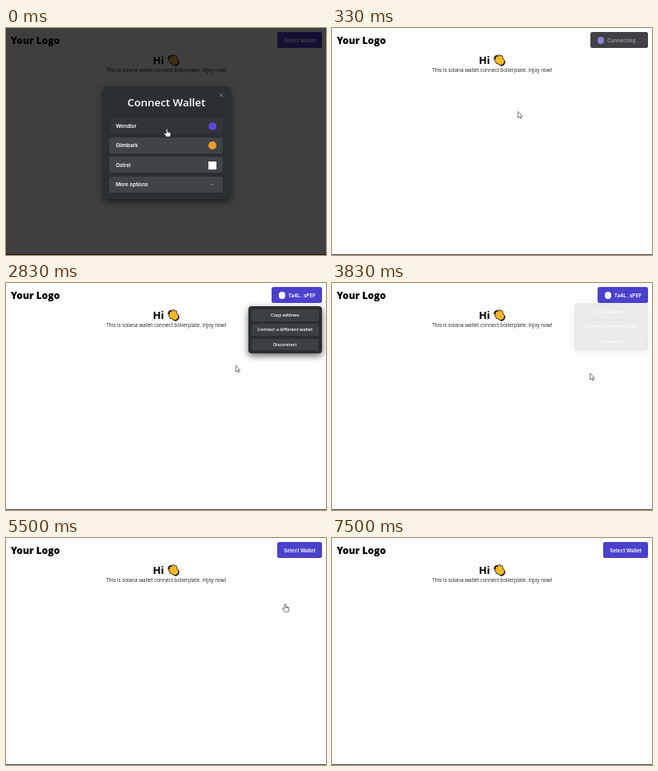
Animation, 400 px wide and 284 px high, one loop 8990 ms. Source, as an HTML page:

```html
<!DOCTYPE html>
<html lang="en">
<head>
<meta charset="utf-8">
<title>Wallet connect demo</title>
<style>
html, body { margin: 0; width: 100%; height: 100%; overflow: hidden; background: #fdfdfd; }
body { font-family: "Open Sans", "Noto Sans", sans-serif; color: #000; }
#stage { position: relative; width: 400px; height: 284px; overflow: hidden; }
#stage > *, .abs { position: absolute; white-space: nowrap; }
.logo { left: 6px; top: 6px; font-weight: 800; font-size: 12px; line-height: 20px; }
.hi { left: 183.5px; top: 29.5px; font-weight: 700; font-size: 13.2px; line-height: 20px; }
.wave { left: 201px; top: 32px; }
.sub { left: 0; width: 400.6px; top: 48px; text-align: center; font-size: 6.33px; line-height: 10px; color: #222; }
.floor { left: 0; top: 283px; width: 400px; height: 1px; background: #4a4a4c; }
#overlay { left: 0; top: 0; width: 400px; height: 284px; background: rgba(0,0,0,.75); }
.modal { left: 121.5px; top: 73px; width: 158.5px; height: 141px; border-radius: 4px;
  background: #2b2f31; box-shadow: 0 3px 8px rgba(0,0,0,.6); color: #fff; }
.title { left: 0; width: 158px; top: 10px; text-align: center; font-weight: 600; font-size: 13.4px; line-height: 20px; }
.wallet, #button { display: flex; align-items: center; box-sizing: border-box; padding: 1px 8px 0;
  height: 20px; border-radius: 2.5px; font: 600 6.33px/20px Inter, Roboto, sans-serif; }
.wallet { left: 7.7px; width: 142.3px; justify-content: space-between; background: #404447; }
.wallet.hover { background: #313537; }
.mark { width: 10px; height: 10px; }
.round { border-radius: 50%; }
#button { right: 5px; top: 5px; background: #4a41cc; color: #fff; }
#button.wait { background: #404144; color: #999; }
#icon { width: 8.5px; height: 8.5px; margin: 0 3.6px 0 .4px; background: #fff; }
.wait #icon { background: #8a80dc; }
.select #icon { display: none; }
#menu { left: 302.5px; top: 29px; width: 92.5px; height: 59px; border-radius: 4px;
  background: #2c2d30; box-shadow: 0 3px 8px rgba(0,0,0,.6); color: #fff; }
.item { left: 4px; width: 84.5px; height: 14.5px; border-radius: 2px; background: #3d4043;
  text-align: center; font-weight: 600; font-size: 5.53px; line-height: 14.5px; }
.item.hover { background: #25272a; }
#cursor { left: 0; top: 0; overflow: visible; }
</style>
</head>
<body>
<div id="stage">
  <div class="logo">Your Logo</div>
  <div class="hi">Hi</div>
  <svg class="wave" width="16" height="16" fill="none" stroke-linecap="round" stroke-linejoin="round">
    <defs><path id="hand" d="M9 10L4 8M9 9L5 5M10 8L8 3.5M11 9L10.8 4.5M9 11L5.6 10.8"/></defs>
    <use href="#hand" stroke="#15151c" stroke-width="4.4"/>
    <circle cx="10.2" cy="10" r="4.6" fill="#fcb827" stroke="#15151c"/>
    <use href="#hand" stroke="#fcb827" stroke-width="3"/>
    <path d="M2 6.5Q2.2 3.4 5 2.6M10.5 15Q14.3 14.6 14.8 11" stroke="#15151c" stroke-width="1.6"/>
  </svg>
  <div class="sub">This is solana wallet connect bolierplate. Injoy now!</div>
  <div class="floor"></div>
  <div id="button"><i id="icon" class="round"></i><span id="label"></span></div>

  <div id="menu">
    <div class="abs item" style="top:4px">Copy address</div>
    <div class="abs item" style="top:22.4px">Connect a different wallet</div>
    <div class="abs item" style="top:40.8px">Disconnect</div>
  </div>

  <div id="overlay">
    <div class="abs modal">
      <svg class="abs" style="left:144px;top:8px" width="6" height="6" stroke="#999" stroke-width=".7"><path d="M.6 .6L5.4 5.4M5.4 .6L.6 5.4"/></svg>
      <div class="abs title">Connect Wallet</div>
      <div class="abs wallet hover" style="top:39px">Wendlor<i class="mark round" style="background:#5648d8"></i></div>
      <div class="abs wallet" style="top:63.6px">Glimbark<i class="mark round" style="background:#f0a02c"></i></div>
      <div class="abs wallet" style="top:88.2px">Ostrel<i class="mark" style="background:#fff"></i></div>
      <div class="abs wallet" style="top:112.8px">More options
        <svg width="10" height="10" fill="none" stroke="#aaa" stroke-width=".6"><path d="M3 4L5 6L7 4"/></svg></div>
    </div>
  </div>

  <svg id="cursor" width="10" height="12" fill="#fff" stroke="#222" stroke-width=".6" stroke-linejoin="round">
    <path id="arrow" d="M0 0V8L1.9 6.3L3.1 9L4.3 8.5L3.1 5.9H5.5Z"/>
    <path id="pointer" d="M-.9 .8Q0 -.7 .9 .8V3.6L4 4.4Q5 4.8 4.9 6.2L4.2 10H-.9L-3.3 6.4Q-3.3 4.8 -1.9 5.6L-.9 6.5ZM.9 3.6V5.4M2.4 4V5.6M3.7 4.4V5.8"/>
  </svg>
</div>
<script>
const LOOP = 8990, FPS = 6;
const LABELS = { select: "Select Wallet", wait: "Connecting ...", on: "Ta4L..sPEF" };
const $ = id => document.getElementById(id);
const items = document.querySelectorAll(".item");
const clamp = v => Math.min(1, Math.max(0, v));

// Cursor moves as curves: first tick, last tick, bend, end point
const home = [201, 126];
const moves = [
  [1, 6, [280, 72], [359, 17]],
  [6, 8, [376, 105], [317.5, 49.7]],
  [13, 18, [212, 90], [322.7, 113]],
  [23, 29, [92, 90], [358.5, 15.3]],
  [29, 32, [356, 48], [349, 82.3]],
  [36, 43, [360, 20], [109, 3]],
  [43, 44, [190, 15], [271, 28]]
];

function cursorAt(tick) {
  let pos = home;
  for (const [from, to, bend, end] of moves) {
    const k = clamp((tick - from) / (to - from));
    pos = pos.map((p, i) => (1 - k) ** 2 * p + 2 * k * (1 - k) * bend[i] + k * k * end[i]);
  }
  return pos;
}

// Menu opens at tick a and fades out at tick b
const pulse = (tick, a, b) => clamp(Math.min(tick - a + .87, b - tick + .09));

function rowAt(x, y) {
  const row = Math.floor((y - 33) / 18.4);
  const inside = x > 306.5 && x < 391 && y - 33 - row * 18.4 < 14.5;
  return inside && row >= 0 && row < 3 ? row : -1;
}

function draw(time) {
  const tick = Math.floor((time + 4) * FPS / 1000);
  const [x, y] = cursorAt(tick);

  $("overlay").style.opacity = clamp(1.667 - tick);

  const state = tick < 1 || tick > 32 ? "select" : tick < 4 ? "wait" : "on";
  $("button").className = state;
  $("label").textContent = LABELS[state];

  const open = pulse(tick, 6, 23) + pulse(tick, 29, 32.9);
  $("menu").style.opacity = open;
  $("menu").style.transform = `translateY(${-4.2 * (1 - open)}px)`;
  const row = tick > 5 && tick < 37 ? rowAt(x, y) : -1;
  items.forEach((item, i) => item.classList.toggle("hover", i === row));

  const overButton = x > 333 && x < 395 && y > 5 && y < 25;
  const pointing = tick < 2 || overButton || row >= 0;
  $("cursor").style.transform = `translate(${x}px, ${y}px)`;
  $("cursor").style.display = tick < 45 ? "" : "none";
  $("arrow").style.display = pointing ? "none" : "";
  $("pointer").style.display = pointing ? "" : "none";
}

const start = performance.now();
function loop() {
  draw((performance.now() - start) % LOOP);
  requestAnimationFrame(loop);
}
loop();
</script>
</body>
</html>
```
